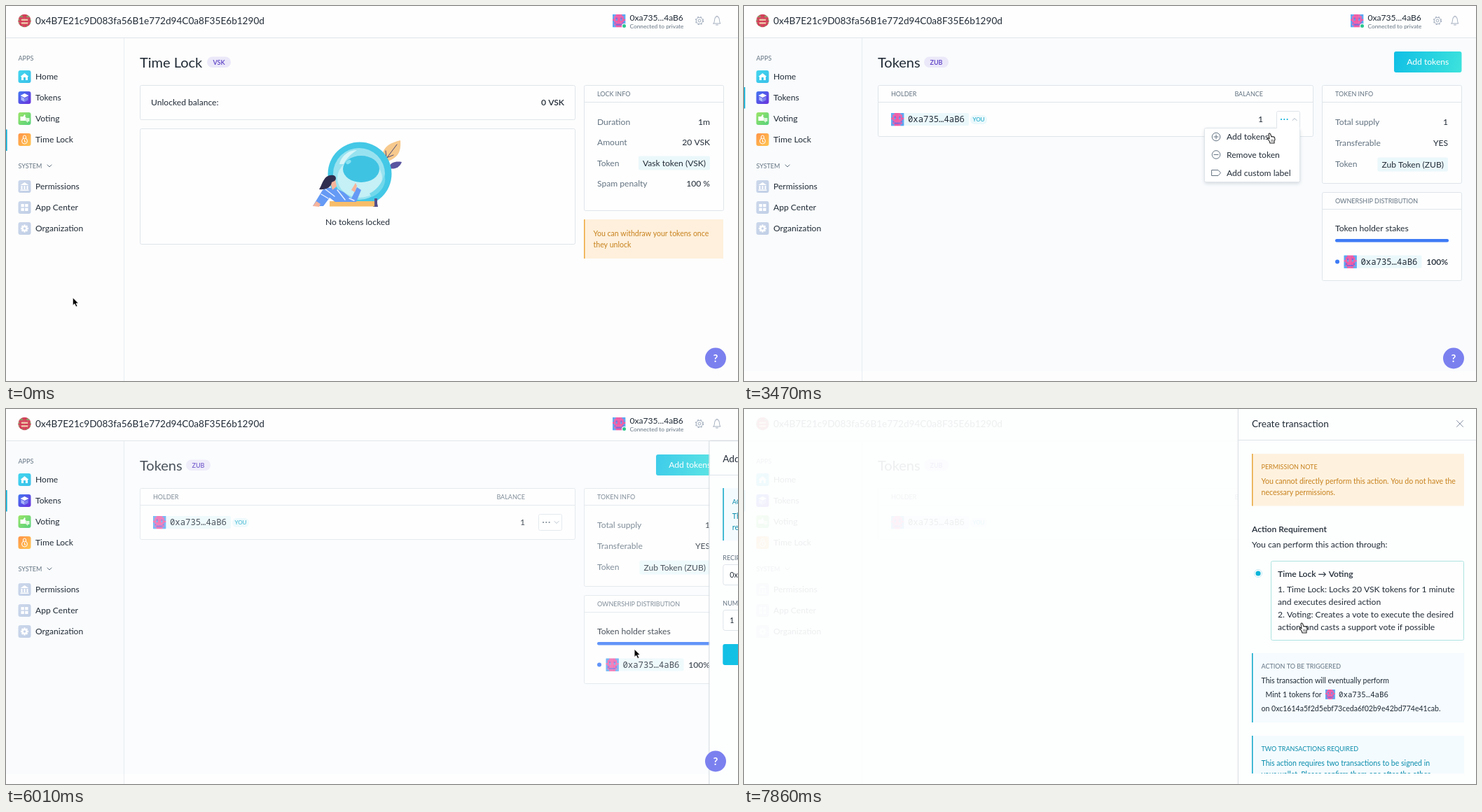
Write an HTML page with a canvas that moves like this. It is 1045x536 px and loops after 8 s.

```html
<!DOCTYPE html>
<html lang="en">
<head>
<meta charset="utf-8">
<title>Token app</title>
<style>
html, body { margin: 0; width: 100%; height: 100%; overflow: hidden; background: #fdfdfd; }
canvas { display: block; width: 1045px; height: 536px; }
</style>
</head>
<body>
<canvas id="stage"></canvas>
<script>
const W = 1045, H = 536, LOOP = 8000;
const canvas = document.getElementById('stage');
const dpr = window.devicePixelRatio || 1;
canvas.width = W * dpr;
canvas.height = H * dpr;
const c = canvas.getContext('2d');

const SANS = 'Lato, sans-serif', MONO = '"Noto Sans Mono", monospace';
const INK = '#212b36', GREY = '#637381', LINE = '#dfe5ea', CYAN = '#08b0d8', TEAL = '#078bab', AMBER = '#c7801c';
const BODY = 12.1, SMALL = 10.55, CAPS = 9, HEAD = 13.6;
const ORG = '0x4B7E21c9D083fa56B1e772d94C0a8F35E6b1290d';
const USER = '0xa7358dFC6290817CBedee22918e005c9b37d4aB6';
const APP = '0xc1614a5f2d5ebf73ceda6f02b9e42bd774e41cab';
const SHORT = '0xa735…4aB6';

const TICKS = [0, 150, 300, 440, 590, 1030, 1180, 1330, 1480, 1620, 1770, 1990, 2140, 2280, 2430, 2580,
  3030, 3180, 3330, 3470, 3620, 3770, 3910, 4060, 4210, 4360, 4530, 4680, 4820, 4970, 5110, 5260, 5410,
  5560, 5700, 5850, 6000, 6150, 6780, 6930, 7070, 7220, 7370, 7560, 7710, 7860];

const POINTER = [[0, 95.3, 417], [590, 65, 131], [1330, 65, 131], [2580, 772, 157], [3180, 772, 157],
  [3470, 751, 182], [4060, 751, 182], [4530, 769, 304], [4820, 769, 304], [5110, 772, 360], [5410, 772, 355],
  [5600, 772, 355], [6150, 925, 341], [7070, 925, 341], [7780, 797, 306]];
const MINT_PANEL = [[3600, 0], [3770, .34], [3910, .8], [4060, .97], [4210, 1], [5600, 1], [5700, .9], [5850, .5], [6000, .12], [6150, 0]];
const TX_PANEL = [[6700, 0], [6930, .08], [7070, .327], [7220, .75], [7370, .93], [7560, .99], [7710, 1]];

// Eased value of a key list [time, ...values] at time t
function track(keys, t) {
  let i = keys.findIndex(k => k[0] > t);
  if (i < 0) return keys[keys.length - 1].slice(1);
  if (i === 0) return keys[0].slice(1);
  const a = keys[i - 1], b = keys[i], u = (t - a[0]) / (b[0] - a[0]), e = u * u * (3 - 2 * u);
  return a.slice(1).map((v, n) => v + (b[n + 1] - v) * e);
}

// y is the middle of the capitals
function text(s, x, y, size = BODY, color = INK, { align = 'left', weight = 400, font = SANS } = {}) {
  c.font = `${weight} ${size}px ${font}`;
  c.textAlign = align;
  c.fillStyle = color;
  c.fillText(s, x, y + size * .355);
}
function box(x, y, w, h, fill, stroke, r = 2) {
  c.beginPath();
  c.roundRect(x, y, w, h, r);
  if (fill) { c.fillStyle = fill; c.fill(); }
  if (stroke) { c.strokeStyle = stroke; c.lineWidth = 1; c.stroke(); }
}
function disc(x, y, r, fill, ry = r, turn = 0) {
  c.beginPath();
  c.ellipse(x, y, r, ry, turn, 0, 7);
  c.fillStyle = fill;
  c.fill();
}
function ring(x, y, r, color, width = 1) {
  c.beginPath();
  c.arc(x, y, r, 0, 7);
  c.strokeStyle = color;
  c.lineWidth = width;
  c.stroke();
}
function path(d, fill, stroke, width = 1, x = 0, y = 0) {
  c.save();
  c.translate(x, y);
  const p = new Path2D(d);
  if (fill) { c.fillStyle = fill; c.fill(p); }
  if (stroke) { c.strokeStyle = stroke; c.lineWidth = width; c.lineJoin = c.lineCap = 'round'; c.stroke(p); }
  c.restore();
}
function blend(x, y, w, h, from, to) {
  const g = c.createLinearGradient(x, y, x + w, y + h);
  g.addColorStop(0, from);
  g.addColorStop(1, to);
  return g;
}
const right = { align: 'right' }, mid = { align: 'center' }, mono = { font: MONO };
const hline = (x, y, w) => { c.fillStyle = LINE; c.fillRect(x, y, w, 1); };

function identicon(x, y, size, rows, colors) {
  const s = size / 8;
  rows.forEach((row, j) => {
    for (let i = 0; i < 8; i++) {
      c.fillStyle = colors[row[i < 4 ? i : 7 - i]];
      c.fillRect(x + i * s, y + j * s, s + .3, s + .3);
    }
  });
}
const userIcon = (x, y, size) => identicon(x, y, size,
  ['bbpp', 'bppp', 'bpvp', 'ppbp', 'bppp', 'bvpp', 'bpvv', 'bbpp'], { b: '#58a6f2', p: '#ee5ba6', v: '#8266d6' });

function note(x, y, w, h, fill, edge) {
  c.fillStyle = fill;
  c.fillRect(x, y, w, h);
  c.fillStyle = edge;
  c.fillRect(x, y, 1.5, h);
}
function card(x, y, w, h, title) {
  box(x + .5, y + .5, w, h, '#fefefe', LINE, 2);
  if (!title) return;
  hline(x, y + 24, w);
  text(title, x + 19, y + 12.5, CAPS, GREY);
}
function badge(s, y) {
  c.font = `400 ${BODY}px ${SANS}`;
  const w = c.measureText(s).width + 12;
  box(1005 - w, y - 10, w, 20, '#ebf8fb');
  text(s, 999, y, BODY, INK, right);
}
function tag(s, x, w) {
  box(x, 72.5, w, 15.5, '#ebe8f9', null, 8);
  text(s, x + w / 2, 81, CAPS, '#5b3fc4', { align: 'center', weight: 600 });
}
function cross(x, y) {
  path('M-4.5-4.5L4.5 4.5M4.5-4.5L-4.5 4.5', null, '#8a96a8', 1, x, y);
}
function cta(x, y, w, h, label) {
  box(x, y, w, h, blend(x, y, w, h, '#10bfe5', '#3de3dc'), null, 3);
  text(label, x + w / 2, y + h / 2, BODY, '#fff', mid);
}

const GLYPHS = {
  Home: [101, '#42d6ee', '#39bfe9', () => path('M0-5L6 0H4.5V5H1.5V1H-1.5V5H-4.5V0H-6Z', '#fff')],
  Tokens: [131, '#4277f2', '#6a31dc', () => {
    path('M0-6L6-3L0 0L-6-3Z', '#fff');
    path('M-5-1.5L0 1V6L-5 3.5Z', '#a9b7fa');
    path('M5-1.5L0 1V6L5 3.5Z', '#7d83ee');
  }],
  Voting: [161, '#9be568', '#55d07b', () => {
    path('M-6-3H-2L0-6L1-5V-2H2V3H-6Z', '#fff');
    path('M7-1H2V4H3L4 6L5 4H7Z', '#dff8dc');
  }],
  'Time Lock': [191, '#ff9448', '#ffc54e', () => {
    path('M-2-2V-4A2 2 0 0 1 2-4V-2', null, '#fff', 1);
    ring(0, 2, 4, '#fff');
    path('M0 0V3H1.5', null, '#fff', 1);
  }],
  Permissions: [258, '#cbd7eb', '#c1cfe6', () => path('M-6-2L0-6L6-2ZM-5-1H-3V4H-5ZM-1-1H1V4H-1ZM3-1H5V4H3ZM-6 4.5H6V6H-6Z', '#fff')],
  'App Center': [288, '#cbd7eb', '#c1cfe6', () => path('M-5-5H-.7V-.7H-5ZM.7-5H5V-.7H.7ZM-5 .7H-.7V5H-5ZM.7 .7H5V5H.7Z', '#fff')],
  Organization: [318, '#cbd7eb', '#c1cfe6', () => {
    for (let i = 0; i < 4; i++) { c.rotate(Math.PI / 4); c.fillStyle = '#fff'; c.fillRect(-1.2, -5.5, 2.4, 11); }
    disc(0, 0, 4, '#fff');
    disc(0, 0, 1.8, '#c6d3e8');
  }]
};

function chrome(t) {
  c.fillStyle = '#fefefe';
  c.fillRect(0, 0, W, 45);
  hline(0, 45, W);
  c.fillStyle = '#e8edf1';
  c.fillRect(168, 46, 1, H);
  c.save();
  c.beginPath();
  c.arc(26.5, 21, 9.2, 0, 7);
  c.clip();
  identicon(17, 11.5, 19, ['rrrr', 'rggr', 'rrrr', 'grcc', 'rrrr', 'grcc', 'rrrr', 'rrgr'], { r: '#d23a55', g: '#8a9561', c: '#edc3a4' });
  c.restore();
  text(ORG, 42, 21.5, HEAD);
  userIcon(866, 12, 18);
  disc(882.5, 28.5, 3.5, '#fff');
  disc(882.5, 28.5, 2.5, '#2cc68f');
  text('0xa735...4aB6', 890.5, 17);
  text('Connected to private', 890.5, 29, 8.3, GREY);
  ring(990, 21, 2, '#a3aebe');
  ring(990, 21, 4.6, '#a3aebe', .9);
  c.setLineDash([2.2, 2.2]);
  ring(990, 21, 5.5, '#a3aebe', 1.2);
  c.setLineDash([]);
  path('M-5 4H5C3 2 4-1 3-3A3 3 0 0 0-3-3C-4-1-3 2-5 4ZM-1.5 6H1.5M0-6V-7', null, '#a3aebe', 1, 1015, 21);

  text('APPS', 17.5, 75, CAPS, GREY);
  text('SYSTEM', 17.5, 229, CAPS, GREY);
  path('M-3-1.5L0 1.5L3-1.5', null, GREY, 1, 62, 228.5);
  for (const [name, [y, from, to, glyph]] of Object.entries(GLYPHS)) {
    c.save();
    c.translate(26.5, y);
    box(-9, -9, 18, 18, blend(-9, -9, 18, 18, from, to), null, 3);
    glyph();
    c.restore();
    text(name, 42, y);
  }
  c.fillStyle = t >= 1180 && t < 1330 ? '#4cc6e4' : CYAN;
  c.fillRect(0, t < 1330 ? 176.5 : 116, 1.6, 30.5);
}

function picture() {
  path('M540 222C534 208 541 197 563 192C564 205 562 216 545 222Z', '#f7c98c');
  path('M537 226L558 198M543 217L542 207M543 217L553 213', null, '#4b4a78', 1);
  path('M546 232C549 222 558 222 565 223C562 231 555 234 546 232Z', '#5a55a0');
  path('M526 262L531 287H524Z', '#4f4b86');
  disc(505, 240, 45.5, '#43c8e6');
  disc(504, 240, 37, '#98e2f0');
  disc(505, 246, 32, '#c4f0f6', 28);
  disc(507, 233, 26, '#3fc3e3', 19);
  path('M476 226C480 211 492 206 501 206C492 212 486 218 482 226Z', '#d6f5f9');
  path('M519 268C532 261 539 249 540 240C545 254 535 268 522 273Z', '#71d8eb');
  disc(489, 223, 4, '#8ae1f0', 2.5, -.6);
  c.fillStyle = '#f7bd69';
  c.fillRect(462, 279, 65, 7.5);
  c.fillStyle = '#554f8c';
  c.fillRect(526, 275, 4, 12);
  path('M438 286L452 263C462 256 474 262 482 266L493 275L501 259L507 263L500 280H470L462 274L453 286Z', '#659af5');
  path('M450 269L460 275M456 262L469 272M473 263L484 277M490 275L497 278', null, '#e9f2ff', 1.4);
  path('M438 286L443 279L449 283L447 287Z', '#f6b49b');
  path('M493 263L499 253L501 257L498 266Z', '#f6b49b');
  path('M463 252L470 248L472 258L466 263Z', '#f6b49b');
  path('M447 262C451 257 453 243 463 242C471 240 473 247 469 250L465 252C464 260 456 263 447 262Z', '#2f2d4f');
}

function lockPage() {
  text('Time Lock', 191, 81, 20);
  tag('VSK', 287, 34);
  card(191, 113, 621, 49);
  text('Unlocked balance:', 207, 138);
  text('0 VSK', 797, 138, BODY, INK, { align: 'right', weight: 600 });
  card(191, 175, 621, 165);
  picture();
  text('No tokens locked', 502, 309, BODY, INK, mid);
  card(825, 113, 199, 179, 'LOCK INFO');
  ['Duration', 'Amount', 'Token', 'Spam penalty'].forEach((s, i) => text(s, 844, 165.5 + i * 29.5, BODY, GREY));
  text('1m', 1005, 165.5, BODY, INK, right);
  text('20 VSK', 1005, 195, BODY, INK, right);
  badge('Vask token (VSK)', 224.5);
  text('100 %', 1005, 254, BODY, INK, right);
  note(825, 305, 199, 56, '#fef0dc', '#eda83a');
  text('You can withdraw your tokens once', 838.5, 325, SMALL, AMBER);
  text('they unlock', 838.5, 341, SMALL, AMBER);
}

function holder(x, y) {
  box(x, y - 9, 111, 18, '#ebf8fb');
  userIcon(x, y - 9, 18);
  text(SHORT, x + 24, y, 12.25, INK, mono);
}

function tokenPage(open) {
  text('Tokens', 191, 81, 20);
  tag('ZUB', 257, 35);
  cta(928, 65, 96.5, 30, 'Add tokens');
  card(191, 113, 621, 73, 'HOLDER');
  text('BALANCE', 741, 125.5, CAPS, GREY, right);
  holder(210, 162);
  box(323, 156, 24, 13, '#ebf8fb', null, 6);
  text('YOU', 335, 162.5, 8, '#0aa3c6', mid);
  text('1', 741, 162, BODY, INK, right);
  card(825, 113, 199, 140, 'TOKEN INFO');
  text('Total supply', 844, 165.5, BODY, GREY);
  text('Transferable', 844, 195.5, BODY, GREY);
  text('Token', 844, 226, BODY, GREY);
  text('1', 1005, 165.5, BODY, INK, right);
  text('YES', 1005, 195.5, BODY, INK, right);
  badge('Zub Token (ZUB)', 226.5);
  card(825, 266, 199, 126, 'OWNERSHIP DISTRIBUTION');
  text('Token holder stakes', 844, 318);
  box(844, 333, 162, 4.5, '#3e7bf6', null, 2);
  disc(847, 365.5, 3, '#3e7bf6');
  holder(856.5, 365.5);
  text('100%', 1005, 365.5, BODY, INK, { align: 'right', weight: 600 });

  if (open) {
    c.save();
    c.shadowColor = 'rgba(60,80,100,.22)';
    c.shadowBlur = 5;
    c.shadowOffsetY = 2;
    box(657.5, 174.5, 136, 77, '#fff');
    c.restore();
    box(657.5, 174.5, 136, 77, '#fff', LINE);
  }
  box(760.5, 150.5, 33, open ? 25 : 23, '#fff', LINE);
  if (open) { c.fillStyle = '#fff'; c.fillRect(761, 172, 32, 6); }
  for (let i = 0; i < 3; i++) disc(767 + i * 4.3, 162, 1.1, open ? CYAN : GREY);
  path(open ? 'M-3 1.5L0-1.5L3 1.5' : 'M-3-1.5L0 1.5L3-1.5', null, '#a8b4c2', 1, 786, 162);
  if (!open) return;
  text('Add tokens', 689, 187);
  text('Remove token', 689, 212.5);
  text('Add custom label', 689, 238.5);
  ring(674, 187, 5.8, GREY);
  ring(674, 212.5, 5.8, GREY);
  path('M-3 0H3M0-3V3', null, GREY, 1, 674, 187);
  path('M-3 0H3', null, GREY, 1, 674, 212.5);
  path('M-6-4H3L6.5 0L3 4H-6Z', null, GREY, 1, 674, 238.5);
}

function required(s, y) {
  text(s, 725, y, CAPS, GREY);
  text('*', 725 + c.measureText(s).width + 3, y + 1, 11, CYAN);
}

function mintForm(t) {
  hline(706, 94, 339);
  text('Add tokens', 725, 71.5, HEAD);
  cross(1022, 71);
  note(725, 113, 303, 75, '#f4fbfe', '#0ba6c8');
  text('ACTION', 738.5, 132.5, CAPS, TEAL);
  text('This action will create tokens and transfer them to the', 738.5, 153, SMALL, TEAL);
  text('recipient below.', 738.5, 169, SMALL, TEAL);
  required('RECIPIENT (MUST BE A VALID ETHEREUM ADDRESS)', 213);
  box(725.5, 222.5, 302, 29, '#fff', LINE, 3);
  text(USER, 735, 237.5, SMALL);
  ring(1014.5, 236, 4.8, '#8a96a8');
  path('M1018 240L1021.5 243.5', null, '#8a96a8');
  required('NUMBER OF TOKENS', 278);
  const focus = t >= 4530 && t < 5410, typed = t >= 4820;
  box(725.5, 287.5, 302, 29, '#fff', focus ? CYAN : LINE, 3);
  if (typed) text('1', 735, 302.5, SMALL);
  if (focus) {
    c.fillStyle = INK;
    c.fillRect(typed ? 741 : 735, 294.5, 1, 15);
  }
  if (t >= 4530 && t < 4970) {
    box(1009.5, 297, 7.5, 11, '#f1f2f4', null, 3);
    path('M-2-1.5L0-4L2-1.5M-2 1.5L0 4L2 1.5', null, '#65707e', 1, 1013.3, 302.5);
  }
  if (typed) cta(725, t >= 5560 ? 336 : 335, 303, 30, 'Add tokens');
  else {
    box(725, 335, 303, 30, '#f1f3f7', null, 3);
    text('Add tokens', 876.5, 350.5, BODY, GREY, mid);
  }
}

function txForm(t) {
  hline(706, 44, 339);
  text('Create transaction', 725, 21.5, HEAD);
  cross(1022, 21);
  c.beginPath();
  c.rect(706, 45, 339, 476);
  c.clip();
  note(725, 64, 303, 74.5, '#fef2df', '#e6a53a');
  text('PERMISSION NOTE', 738.5, 82.5, CAPS, AMBER);
  text('You cannot directly perform this action. You do not have the', 738.5, 103, SMALL, AMBER);
  text('necessary permissions.', 738.5, 119, SMALL, AMBER);
  text('Action Requirement', 725, 172, BODY, INK, { weight: 600 });
  text('You can perform this action through:', 725, 194);
  disc(734, 235, 6, '#fff');
  ring(734, 235, 5.5, '#c3eaf2');
  disc(734, 235, 3.6, '#0bb4d8');
  box(752.5, 217.5, 275, 113, '#fefefe', t >= 7860 ? '#ade4e0' : '#e3e8ed', 2);
  text('Time Lock → Voting', 762, 236, BODY, INK, { weight: 600 });
  ['1. Time Lock: Locks 20 VSK tokens for 1 minute', 'and executes desired action',
    '2. Voting: Creates a vote to execute the desired', 'action, and casts a support vote if possible']
    .forEach((s, i) => text(s, 762, 257.5 + i * 18.2));
  note(725, 349, 303, 99, '#f5fbfe', '#0ba6c8');
  text('ACTION TO BE TRIGGERED', 738.5, 368, CAPS, GREY);
  text('This transaction will eventually perform', 738.5, 388.5, SMALL);
  text('Mint 1 tokens for', 744.5, 408.5, SMALL);
  userIcon(830, 401, 13.5);
  text(SHORT, 849, 408.5, 10.75, INK, mono);
  text('on ' + APP + '.', 738.5, 428.5, SMALL);
  note(725, 467, 303, 60, '#f4fbfe', '#0ba6c8');
  text('TWO TRANSACTIONS REQUIRED', 738.5, 485.5, CAPS, TEAL);
  text('This action requires two transactions to be signed in', 738.5, 506, SMALL, TEAL);
  text('your wallet. Please confirm them one after the other.', 738.5, 522, SMALL, TEAL);
}

// Veil plus a sheet sliding in from the right; p runs from 0 to 1
function panel(p, x, y, form, t) {
  if (p <= 0) return;
  c.fillStyle = `rgba(253,254,254,${.93 * p ** .75})`;
  c.fillRect(x, y, W, H);
  c.save();
  c.translate((1 - p) * 339, 0);
  c.shadowColor = 'rgba(50,60,75,.2)';
  c.shadowBlur = 3;
  c.fillStyle = '#fdfefe';
  c.fillRect(706, y, 345, H);
  c.shadowColor = 'transparent';
  c.fillStyle = '#dde2e7';
  c.fillRect(705, y, 1, H);
  form(t);
  c.restore();
}

function pointer(t) {
  const [x, y] = track(POINTER, t);
  const hand = (t >= 590 && t < 1480) || (t >= 2580 && t < 4210) || t >= 7860;
  if (t >= 4530 && t < 4970) {
    path('M-3-6.5Q0-6.5 0-4.5Q0-6.5 3-6.5M0-4.5V4.5M-3 6.5Q0 6.5 0 4.5Q0 6.5 3 6.5M-1.5 2H1.5', null, '#222', 1.2, x, y);
  } else if (hand) {
    path('M-2 1Q-1-1 .5 1L2 5L3 4.5L4 5L5 4.8L6.5 6L7 9L6 11V14H0L-1 11L-4 7.5Q-3 5.5-1 8Z', '#fff', '#222', 1.1, x, y);
    path('M2 9V12M4 9V12', null, '#222', .7, x, y);
  } else {
    path('M0 0V11L2.6 8.7L4.7 13L6.7 12L4.7 8H8Z', '#000', '#fff', .8, x, y);
  }
}

function draw(now) {
  const time = now % LOOP;
  const t = TICKS.filter(k => k <= time).pop();
  c.setTransform(dpr, 0, 0, dpr, 0, 0);
  c.fillStyle = '#fdfdfd';
  c.fillRect(0, 0, W, H);
  c.fillStyle = '#f9fbfd';
  if (t >= 1030 && t < 3030) c.fillRect(0, 73, 1025, 288);
  else if (t >= 3030 && t < 6150) c.fillRect(0, 47, W, 475);
  chrome(t);
  if (t < 1030) lockPage();
  if (t >= 2140) {
    c.globalAlpha = Math.min(1, .35 + (t - 2140) / 450);
    tokenPage(t >= 3180 && t < 3620);
    c.globalAlpha = 1;
  }
  panel(track(MINT_PANEL, t)[0], 169, 46, mintForm, t);
  disc(1013, 503.5, 15, '#7b80ef');
  text('?', 1013, 503.5, 15, '#fff', { align: 'center', weight: 700 });
  panel(track(TX_PANEL, t)[0], 0, 0, txForm, t);
  pointer(t);
}

let start;
function loop(now) {
  start ??= now;
  draw(now - start);
  requestAnimationFrame(loop);
}
draw(0);
requestAnimationFrame(loop);
</script>
</body>
</html>
```
